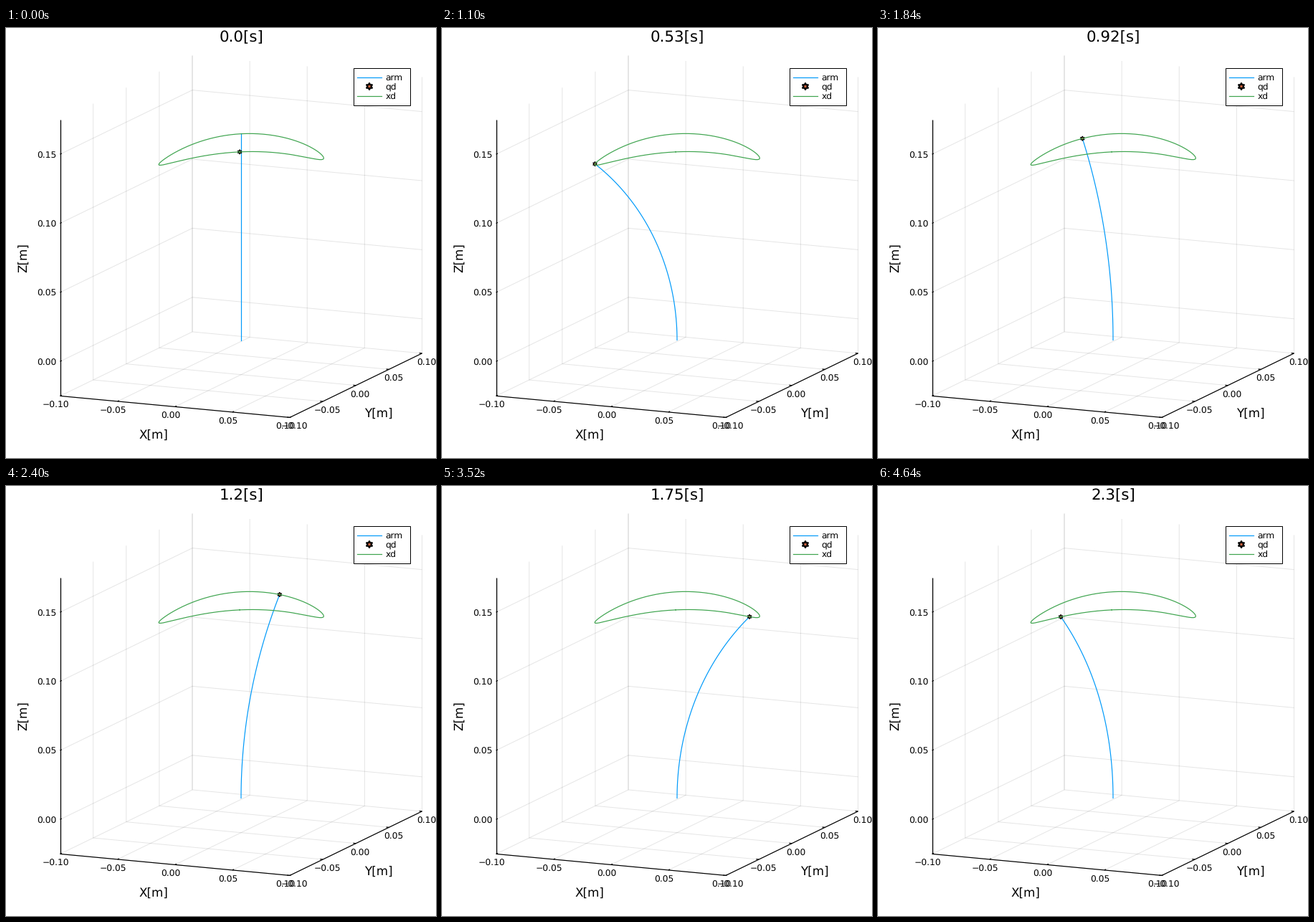
Animation, 600 px wide and 600 px high, one loop 4.66 s. Source, as a matplotlib script:

```python
import numpy as np
import matplotlib.pyplot as plt
from matplotlib.animation import FuncAnimation
from matplotlib.collections import LineCollection
from matplotlib.patches import Polygon, Rectangle

plt.rcParams["font.family"] = "DejaVu Sans"
plt.rcParams["text.hinting"] = "none"

SIZE, DPI = 600, 100
PX = 72 / DPI                 # points per pixel
TICK, GUIDE, TITLE = 8.8, 12.1, 15.4
BLUE, ORANGE, GREEN = "#009AFA", "#E36F47", "#3EA44E"
BASE = np.array([328.0, 435.5])
ARM = 289.0                   # arm length on screen
SPEED = 3.0                   # angular speed of the star, rad/s

fig = plt.figure(figsize=(SIZE / DPI, SIZE / DPI), dpi=DPI, facecolor="white")
ax = fig.add_axes([0, 0, 1, 1])
ax.set_xlim(0, SIZE)
ax.set_ylim(SIZE, 0)
ax.axis("off")


def project(x, y, z):
    """Orthographic view of a point in metres, in pixels."""
    return (BASE[0] + 1602.5 * x + 922.5 * y,
            BASE[1] + 150 * x - 447.5 * y - 1927.5 * z)


def label(x, y, text, size=TICK, ha="center", **kw):
    """Text whose digits are centred on height y."""
    return ax.text(x, y + 0.365 * size / PX, text, size=size, ha=ha,
                   va="baseline", zorder=6, **kw)


def star(cx, cy, r):
    a = np.arange(12) * np.pi / 6
    rad = np.where(np.arange(12) % 2, r / 2, r)
    return np.column_stack([cx + rad * np.sin(a), cy - rad * np.cos(a)])


def add_star(cx, cy, r, width, z):
    patch = Polygon(star(cx, cy, r), closed=True, fc=ORANGE, ec="black",
                    lw=width * PX, joinstyle="miter", zorder=z)
    return ax.add_patch(patch)


def number(v):
    return f"{v:.2f}".replace("-", "\u2212")


# Axes, grid and ticks
LO, HI, BOT, TOP = -0.1, 0.1, -0.025, 0.175
STUB = 0.012 * (HI - LO)
grid, ticks = [], []


def path(*points):
    return [project(*p) for p in points]


for v in (-0.1, -0.05, 0, 0.05, 0.1):
    grid.append(path((v, LO, BOT), (v, HI, BOT), (v, HI, TOP)))
    grid.append(path((HI, v, BOT), (LO, v, BOT), (LO, v, TOP)))
    ticks.append(path((v, LO, BOT), (v, LO + STUB, BOT)))
    ticks.append(path((HI, v, BOT), (HI - STUB, v, BOT)))
    px, py = project(v, LO, BOT)
    label(px - 6, py + 12.3, number(v))
    px, py = project(HI, v, BOT)
    label(px + 6, py + 12.3, number(v))

for v in (0, 0.05, 0.10, 0.15):
    grid.append(path((LO, LO, v), (LO, HI, v), (HI, HI, v)))
    ticks.append(path((LO, LO, v), (LO, LO + STUB, v)))
    px, py = project(LO, LO, v)
    label(px - 4.7, py + 0.8, number(v), ha="right")

edges = [path((LO, LO, TOP), (LO, LO, BOT)),
         path((LO, LO, BOT), (HI, LO, BOT)),
         path((HI, LO, BOT), (HI, HI, BOT))]
ax.add_collection(LineCollection(grid, colors=[(0, 0, 0, 0.1)], linewidths=PX,
                                 zorder=1))
ax.add_collection(LineCollection(edges + ticks, colors="black",
                                 linewidths=1.2 * PX, zorder=2))

label(205.5, 568, "X[m]", GUIDE)
label(520, 538, "Y[m]", GUIDE)
ax.text(30, 320.5, "Z[m]", size=GUIDE, rotation=90, ha="center",
        va="baseline", rotation_mode="anchor")
title = label(328.4, 11.2, "", TITLE)

# Legend
ax.add_patch(Rectangle((484.5, 55.5), 79, 52, fc="white", ec="black",
                       lw=PX, zorder=5))
for y, name, color in ((68.5, "arm", BLUE), (81.5, "qd", None),
                       (94.5, "xd", GREEN)):
    if color:
        ax.plot([490, 524], [y, y], color=color, lw=1.2 * PX, zorder=6)
    else:
        add_star(507, y, 4.9, 2, 6)
    label(529.5, y, name, ha="left")

# Star path: phase in degrees and the place on screen
KEYS = np.array([
    (0, 326.5, 173), (15, 293.5, 175.6), (35.3, 255, 182.5),
    (43.5, 242.5, 185.4), (60, 224.4, 190), (75, 215.5, 191.5),
    (91, 213.5, 189.3), (110, 220.7, 183), (134.4, 246.5, 168.5),
    (158.1, 285, 154), (180, 330, 147.7), (205.6, 381.5, 151.5),
    (229, 419, 163), (257, 440.5, 177.5), (276.7, 442.5, 183),
    (290, 437.5, 183.7), (305, 424.7, 181.4), (324.2, 398, 176.6),
    (340, 369, 173.5)])


def harmonics(phase):
    phase = np.atleast_1d(phase)[:, None] * np.arange(1, 5)
    return np.hstack([np.ones((len(phase), 1)), np.sin(phase), np.cos(phase)])


COEF = np.linalg.lstsq(harmonics(np.radians(KEYS[:, 0])), KEYS[:, 1:],
                       rcond=None)[0]


def orbit(phase):
    return harmonics(phase) @ COEF


def arm_curve(tip):
    """Arc of constant curvature that leaves the base straight up."""
    dx, height = tip[0] - BASE[0], BASE[1] - tip[1]
    bend = abs(dx) / 128 + 0.05
    s = np.linspace(0, bend, 50)
    lean = (1 - np.cos(s)) / (1 - np.cos(bend))
    radius = ARM / bend
    rise = radius * np.sin(s) + (height - radius * np.sin(bend)) * lean
    return BASE[0] + dx * lean, BASE[1] - rise


arm, = ax.plot([], [], color=BLUE, lw=1.2 * PX, zorder=3)
goal = add_star(0, 0, 3.2, 1.2, 3.5)
ax.plot(*orbit(np.linspace(0, 2 * np.pi, 300)).T, color=GREEN,
        lw=1.2 * PX, zorder=4)

REST = BASE - (0, ARM)
HOLD = (0, 1, 1, 1, 1, 1, 2)  # every third pose stays five times as long


def update(n):
    step = 3 * (n // 7) + HOLD[n % 7]
    t = step * 0.023
    place = orbit(SPEED * t)[0]
    reach = 1 - np.exp(-t / 0.03)
    arm.set_data(*arm_curve(REST + (place - REST) * reach))
    goal.set_xy(star(*place, 3.2))
    title.set_text(f"{round(step * 23 / 10) / 100}[s]")
    return arm, goal, title


anim = FuncAnimation(fig, update, frames=233, interval=20, repeat=True,
                     repeat_delay=0, blit=False)
plt.show()
```
